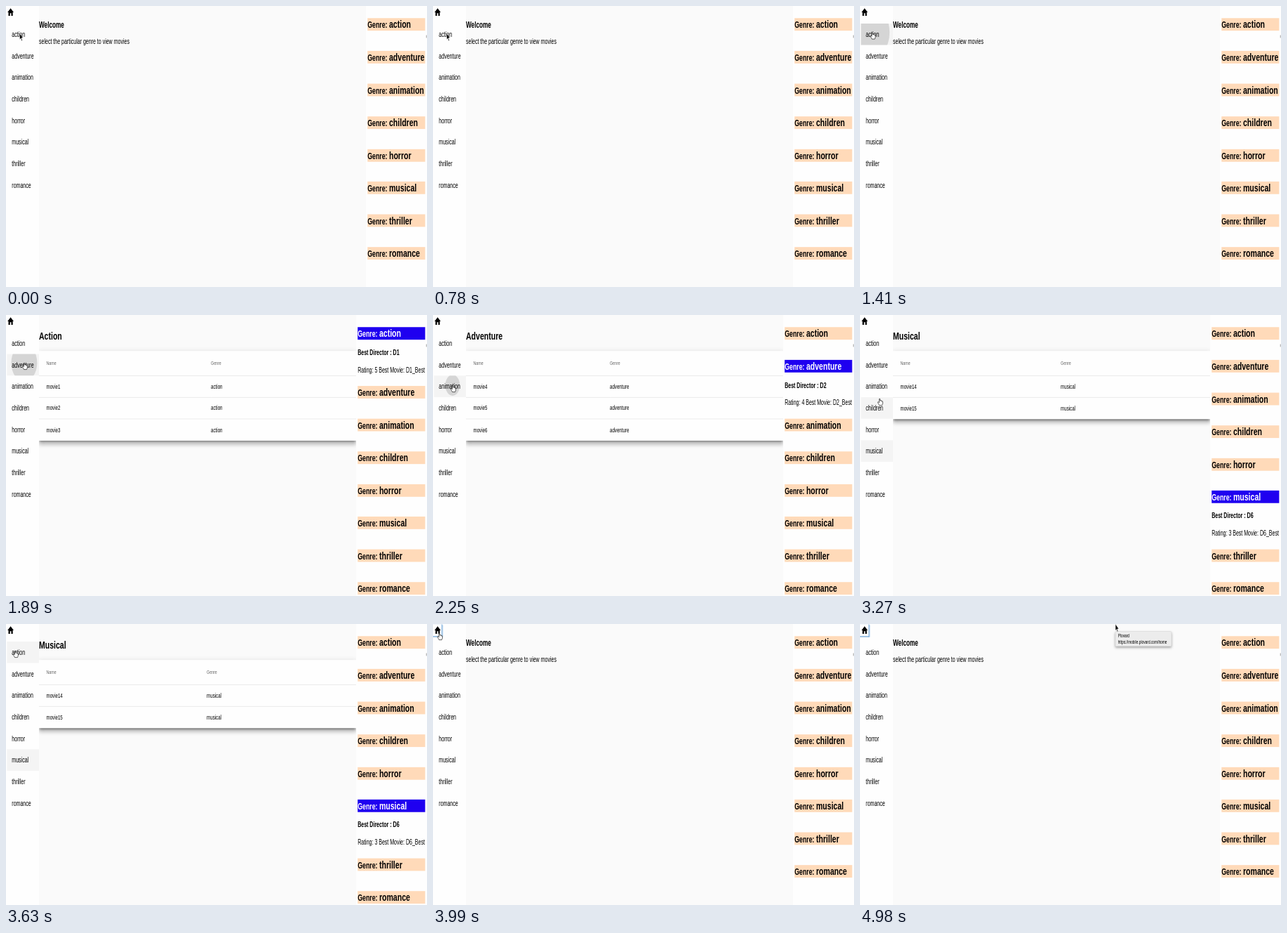
Recreate the animation shown at these times as an HTML page. Size 600x400 px, loop 5.01 s.

```html
<!DOCTYPE html>
<html lang="en">
<head>
<meta charset="utf-8">
<title>Movie genres</title>
<style>
  html, body { margin: 0; width: 100%; height: 100%; overflow: hidden; }
  body { position: relative; background: #fafafa; }
  /* A 1366 x 626 page shown on a 600 x 400 stage */
  #page {
    position: absolute; left: 0; top: 0; width: 1366px; height: 626px;
    transform: scale(calc(600 / 1366), calc(400 / 626)); transform-origin: 0 0;
    overflow: hidden; background: #fafafa; color: #000;
    font: 16px/1.15 "Liberation Sans", Arial, sans-serif;
  }
  #page div, #page svg { position: absolute; white-space: nowrap; box-sizing: border-box; }
  #side { left: 0; top: 0; width: 107px; height: 626px; background: #fefefe; }
  #page .item {
    left: 3px; width: 104px; height: 48px; padding-left: 16px;
    line-height: 49px; overflow: hidden;
  }
  .item.lit { background: rgba(0, 0, 0, .04); }
  .ripple { border-radius: 50%; background: rgba(0, 0, 0, .13); }
  #home { left: 3px; top: 2px; }
  #focus {
    left: 0; top: 1px; width: 30px; height: 28px;
    border: solid #6fa6d8; border-width: 0 2px 2px 0;
    box-shadow: 1px 1px 3px #9cc4e8;
  }
  #main { left: 107px; top: 0; height: 626px; overflow: hidden; }
  #title { left: 0; font-weight: bold; }
  #hint { left: 0; top: 70px; }
  table {
    position: absolute; left: 0; top: 80px; width: 100%;
    border-collapse: separate; border-spacing: 0; background: #fefefe; text-align: left;
    box-shadow: 0 5px 5px -3px rgba(0, 0, 0, .36), 0 8px 10px 1px rgba(0, 0, 0, .2),
      0 3px 14px 2px rgba(0, 0, 0, .12);
  }
  th, td { box-sizing: border-box; height: 48px; padding: 0; border-bottom: 1px solid #e0e0e0; font-size: 14px; }
  th { height: 56px; font-size: 12px; font-weight: normal; color: rgba(0, 0, 0, .6); }
  tr :first-child { padding-left: 24px; }
  tr :last-child { padding-right: 21px; }
  tr:last-child td { border-bottom: 0; }
  #panel { right: 0; top: 0; height: 626px; background: #fefefe; }
  #page .band {
    left: 5px; right: 6.5px; height: 28px; line-height: 28px;
    background: #ffdab9; font-size: 24px; font-weight: bold;
  }
  .band small { font-size: 20px; }
  #page .band.on { background: #1f00f0; color: #fff; }
  #director { left: 5px; font-weight: bold; }
  #rating { left: 5px; }
  #edge { right: 0; top: 65px; width: 3px; height: 6px; background: #bbb; }
  #tip {
    left: 828px; top: 16px; width: 183px; height: 34px; padding: 3px 8px;
    font-size: 11px; line-height: 13.5px; background: #ececec;
    border: 1px solid #d4d4d4; border-radius: 3px; box-shadow: 0 3px 7px rgba(0, 0, 0, .35);
  }
  #cursor { left: 0; top: 0; overflow: visible; }
</style>
</head>
<body>
<div id="page">
  <div id="main">
    <div id="title"></div>
    <div id="hint">select the particular genre to view movies</div>
    <table id="table"></table>
  </div>
  <div id="side">
    <div id="focus"></div>
    <svg id="home" width="24" height="24" viewBox="0 0 24 24"><path d="M10 20v-6h4v6h5v-8h3L12 3 2 12h3v8z"/></svg>
  </div>
  <div id="panel">
    <div id="director"></div>
    <div id="rating"></div>
    <div id="edge"></div>
  </div>
  <div id="tip">Plovard<br>https://mobile.plovard.com/home</div>
  <svg id="cursor" width="20" height="22">
    <path id="arrow" d="M0 0V15L3.6 11.8 6 17.5 8.6 16.4 6.2 11H11Z" fill="#000" stroke="#fff"/>
    <path id="hand" d="M-1.5 1.5C-1.5-.5 1.5-.5 1.5 1.5V5Q4 2 4.5 5.500 7 3 7.500 6.500 10 4.500 10 7.500V11Q9 13 8 15H-1Q-3 12-6 9-6 6.500-3.500 7.500L-1.500 9Z" fill="#fff" stroke="#111" stroke-width="1.2"/>
  </svg>
</div>
<script>
const LOOP = 5010, SX = 600 / 1366, SY = 400 / 626;
const LIST_TOP = 38.5, ROW = 48;
const $ = id => document.getElementById(id);

// name, first movie, movie count, rating
const genres = [
  ["action", 1, 3, 5], ["adventure", 4, 3, 4], ["animation", 7, 2, 3], ["children", 9, 2, 4],
  ["horror", 11, 3, 5], ["musical", 14, 2, 3], ["thriller"], ["romance"]
];

// time, x, y on the stage
const path = [
  [0, 19.5, 38.5], [1000, 19.5, 38.5], [1200, 17.5, 37.5], [1540, 17.5, 37.5],
  [1760, 26, 68], [1950, 26, 68], [2150, 28, 100], [2310, 28, 100],
  [2560, 30, 138], [2710, 30, 138], [2770, 30, 164], [2820, 30, 164],
  [2900, 28, 193], [3040, 28, 193], [3270, 28, 119], [3780, 9, 17],
  [3840, 9, 13], [4080, 9, 13], [4400, 364, 0], [LOOP, 364, 0]
];

const presses = [1322, 1822, 2220, 2630, 2780, 2910];   // one per genre, in order
const HOME_PRESS = 3850, PAGE_DELAY = 105;
const HAND_FROM = 1150, TIP_FROM = 4800;
const RIPPLE_GROW = 225, RIPPLE_LIFE = 350;

function add(parent, cls, html = "") {
  const el = document.createElement("div");
  el.className = cls;
  el.innerHTML = html;
  parent.append(el);
  return el;
}

const items = genres.map(([name], i) => {
  const el = add($("side"), "item", name);
  el.style.top = LIST_TOP + ROW * i + "px";
  return el;
});
const bands = genres.map(([name]) => add($("panel"), "band", `<small>Genre: </small>${name}`));
const ripples = presses.map((_, i) => add(items[i], "ripple"));

function cursorAt(t) {
  const i = path.findIndex(k => k[0] > t);
  const [t0, x0, y0] = path[i - 1], [t1, x1, y1] = path[i];
  const p = (t - t0) / (t1 - t0), e = p * p * (3 - 2 * p);
  return [x0 + (x1 - x0) * e, y0 + (y1 - y0) * e];
}

const lastPress = t => presses.filter(p => p <= t).length - 1;

let shown;
function showPage(n) {
  if (n === shown) return;
  shown = n;
  const home = n < 0;
  const left = home ? 1168 : 1136;
  $("main").style.width = left - 107 + "px";
  $("panel").style.width = 1366 - left + "px";
  for (const id of ["table", "director", "rating"]) $(id).style.display = home ? "none" : "";
  $("hint").style.display = home ? "" : "none";
  $("title").style.fontSize = home ? "18.72px" : "24px";
  $("title").style.top = home ? "31px" : "33px";

  bands.forEach((b, i) => {
    b.style.top = 27.4 + 72.8 * i + (!home && i > n ? 58 : 0) + "px";
    b.classList.toggle("on", i === n);
  });
  if (home) {
    $("title").textContent = "Welcome";
    return;
  }
  const [name, first, count, rating] = genres[n];
  const top = 27.4 + 72.8 * n;
  $("title").textContent = name[0].toUpperCase() + name.slice(1);
  $("director").textContent = `Best Director : D${n + 1}`;
  $("director").style.top = top + 48 + "px";
  $("rating").textContent = `Rating: ${rating} Best Movie: D${n + 1}_Best`;
  $("rating").style.top = top + 87 + "px";
  let rows = "<tr><th>Name</th><th>Genre</th></tr>";
  for (let i = 0; i < count; i++) rows += `<tr><td>movie${first + i}</td><td>${name}</td></tr>`;
  $("table").innerHTML = rows;
}

function drawRipple(el, i, age) {
  const live = age >= 0 && age < RIPPLE_LIFE;
  el.style.display = live ? "" : "none";
  if (!live) return;
  const [px, py] = cursorAt(presses[i]);
  const x = px / SX - 3, y = py / SY - LIST_TOP - ROW * i;
  const reach = Math.hypot(Math.max(x, 104 - x), Math.max(y, ROW - y));
  const r = reach * (1 - (1 - Math.min(1, age / RIPPLE_GROW)) ** 3);
  el.style.left = x - r + "px";
  el.style.top = y - r + "px";
  el.style.width = el.style.height = 2 * r + "px";
  el.style.opacity = Math.min(1, (RIPPLE_LIFE - age) / (RIPPLE_LIFE - RIPPLE_GROW));
}

function draw(t) {
  const [x, y] = cursorAt(t);
  const homeFocus = t >= HOME_PRESS;
  const hand = t >= HAND_FROM && x < 47 && !(homeFocus && x > 13);
  showPage(t >= HOME_PRESS + PAGE_DELAY ? -1 : lastPress(t - PAGE_DELAY));

  const over = hand ? Math.floor((y / SY - LIST_TOP) / ROW) : -1;
  const focused = homeFocus ? -1 : lastPress(t);
  items.forEach((el, i) => el.classList.toggle("lit", i === over || i === focused));
  ripples.forEach((el, i) => drawRipple(el, i, t - presses[i]));

  $("focus").style.display = homeFocus ? "" : "none";
  $("tip").style.display = t >= TIP_FROM ? "" : "none";
  $("arrow").style.display = hand ? "none" : "";
  $("hand").style.display = hand ? "" : "none";
  $("cursor").style.transform = `translate(${x / SX}px, ${y / SY}px)`;
}

const start = performance.now();
function tick() {
  draw((performance.now() - start) % LOOP);
  requestAnimationFrame(tick);
}
tick();
</script>
</body>
</html>
```
